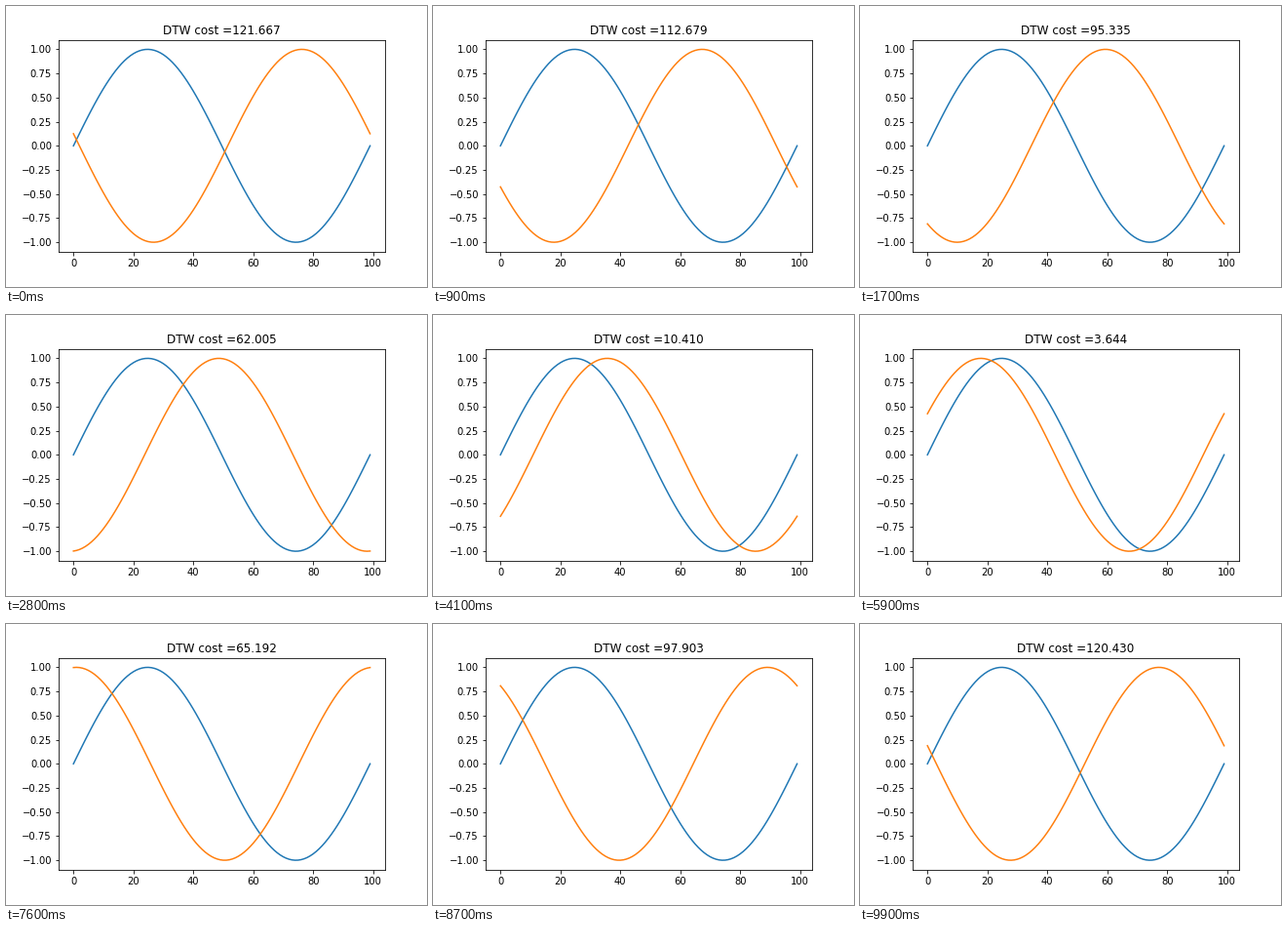
A matplotlib script for the animation above (10 s loop, 432 by 288 pixels).

```python
import numpy as np
import matplotlib.pyplot as plt
from matplotlib.animation import FuncAnimation

FRAMES = 100
WINDOW = 10
START = 48  # phase at the beginning of the loop, in steps

x = np.linspace(0, 2 * np.pi, 100)
base = np.sin(x)


def shifted(frame):
    return np.sin(x + 2 * np.pi * (frame + START) / FRAMES)


def dtw_cost(a, b, w=WINDOW):
    """Dynamic time warping cost with a banded search window."""
    n, m = len(a), len(b)
    dist = np.abs(a[:, None] - b[None, :]).tolist()
    prev = [0.0] + [np.inf] * m
    for i in range(n):
        row = [np.inf] * (m + 1)
        for j in range(max(0, i - w), min(m, i + w)):
            row[j + 1] = dist[i][j] + min(prev[j], prev[j + 1], row[j])
        prev = row
    return prev[m]


fig, ax = plt.subplots(figsize=(6, 4), dpi=72)
fig.subplots_adjust(left=0.125, right=0.9, bottom=0.125, top=0.88)
ax.plot(base)
line, = ax.plot(shifted(0))
title = ax.set_title("")


def update(frame):
    wave = shifted(frame)
    line.set_ydata(wave)
    # the closing sample repeats the first one, so it is not counted
    cost = dtw_cost(wave[:-1], base[:-1])
    title.set_text(f"DTW cost ={cost:.3f}")
    return line, title


anim = FuncAnimation(fig, update, frames=FRAMES, interval=100, repeat=True,
                     repeat_delay=0, blit=False)
plt.show()
```
